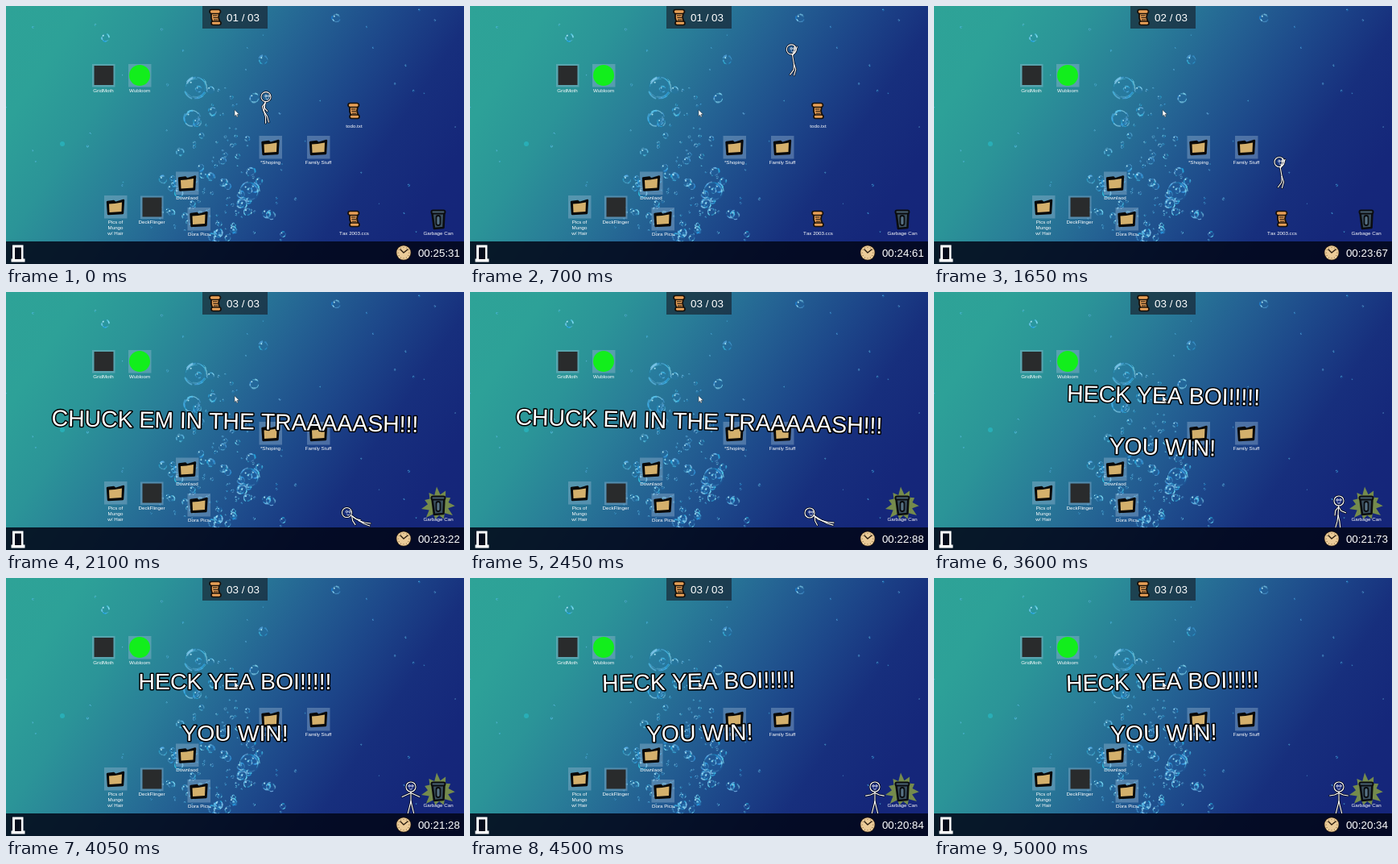
Recreate the animation shown at these times as an HTML page with a canvas. Size 569x320 px, loop 5.05 s.

```html
<!DOCTYPE html>
<html lang="en">
<head>
<meta charset="utf-8">
<title>Desktop dash</title>
<style>
  html, body { margin: 0; width: 100%; height: 100%; overflow: hidden; background: #15297f; }
  canvas { display: block; width: 569px; height: 320px; }
</style>
</head>
<body>
<canvas id="stage" width="569" height="320"></canvas>
<script>
const W = 569, H = 320, LOOP = 5050, STEP = 50;
const FONT = '"Liberation Sans", Arial, sans-serif';
const TODO_AT = 1.1, TAX_AT = 1.75, WIN_AT = 3.45;
const ctx = document.getElementById('stage').getContext('2d');
const rad = deg => deg * Math.PI / 180;

function ramp(t, from, to) {
  const u = Math.min(1, Math.max(0, (t - from) / (to - from)));
  return u * u * (3 - 2 * u);
}

function line(c, ...pts) {
  c.beginPath();
  pts.forEach(p => c.lineTo(...p));
  c.stroke();
}

function shape(c, pts, fill, edge, width) {
  c.beginPath();
  pts.forEach(p => c.lineTo(...p));
  c.closePath();
  c.fillStyle = fill;
  c.fill();
  if (!edge) return;
  c.strokeStyle = edge;
  c.lineWidth = width;
  c.lineJoin = 'round';
  c.stroke();
}

function box(c, x, y, w, h, r, fill, edge, width) {
  c.beginPath();
  c.roundRect(x, y, w, h, r);
  c.fillStyle = fill;
  c.fill();
  if (!edge) return;
  c.strokeStyle = edge;
  c.lineWidth = width;
  c.stroke();
}

function disc(c, x, y, r, fill) {
  c.beginPath();
  c.arc(x, y, r, 0, 7);
  c.fillStyle = fill;
  c.fill();
}

function at(c, x, y, draw, turn = 0) {
  c.save();
  c.translate(x, y);
  c.rotate(rad(turn));
  draw(c);
  c.restore();
}

function text(c, str, x, y, size, align = 'center', outline = 0) {
  c.font = `${size}px ${FONT}`;
  c.textAlign = align;
  c.fontKerning = 'none';
  c.lineJoin = 'round';
  c.lineWidth = outline;
  c.strokeStyle = '#000';
  if (outline) c.strokeText(str, x, y + size * 0.36);
  c.fillStyle = '#fff';
  c.fillText(str, x, y + size * 0.36);
}

function label(c, lines, x, y) {
  lines.split('|').forEach((s, i) => text(c, s, x, y + i * 7.2, 6.2));
}

// Wallpaper

let seed = 11;
function rnd() {
  seed = (seed * 16807) % 2147483647;
  return seed / 2147483647;
}

// A bubble is a dim film with a broken rim of bright flecks
function bubble(c, x, y, r) {
  disc(c, x, y, r, 'rgba(35,130,200,.14)');
  c.lineCap = 'round';
  const flecks = 3 + r * 1.5;
  for (let i = 0; i < flecks; i++) {
    const a = rnd() * 6.28, rim = r * (0.75 + 0.3 * rnd());
    c.strokeStyle = `hsla(${188 + rnd() * 20},80%,${50 + rnd() * 30}%,${0.25 + rnd() * 0.55})`;
    c.lineWidth = 0.5 + rnd() * Math.min(1.3, r / 4);
    c.beginPath();
    c.arc(x, y, rim, a, a + 0.2 + rnd() * 0.7);
    c.stroke();
  }
  disc(c, x - r * 0.45, y - r * 0.45, Math.min(1, r * 0.25), 'rgba(190,245,255,.85)');
}

function wallpaper(c) {
  const g = c.createLinearGradient(0, 0, 540, 362);
  ['#2ea397', '#2da198', '#2b9498', '#297d98', '#246293', '#1d488a', '#172f7d', '#15277a', '#15257a']
    .forEach((col, i, all) => g.addColorStop(i / (all.length - 1), col));
  c.fillStyle = g;
  c.fillRect(0, 0, W, H);

  for (let i = 0; i < 40; i++) bubble(c, rnd() * W, rnd() * 280, 0.4 + rnd() * 1.2);
  for (let i = 0; i < 130; i++) {
    const y = 75 + 215 * Math.sqrt(rnd());
    const spread = 20 + (y - 70) * 0.35;
    bubble(c, 250 + (rnd() + rnd() - 1) * spread + (y - 70) * 0.06, y, 0.8 + 5 * rnd() ** 2);
  }
  [[236, 101, 14], [231, 139, 10], [303, 230, 12], [320, 67, 6], [308, 114, 6], [123, 39, 5], [410, 15, 5]]
    .forEach(b => bubble(c, ...b));
  disc(c, 70, 171, 3, 'rgba(40,180,190,.8)');
}

// Icons, each centred on 0,0

function tile(c) {
  box(c, -14, -14, 28.5, 28.5, 0, 'rgba(165,190,215,.36)');
}

function folder(c) {
  tile(c);
  shape(c, [[-10, -6], [-2, -7], [0, -5], [10, -8], [9, 8], [-9, 9]], '#0a0a0a', '#0a0a0a', 2.4);
  shape(c, [[-8, -3.5], [-1, -4], [8, -5.5], [7.5, 6], [-7.5, 7]], '#d4b06c');
}

function darkSquare(c) {
  tile(c);
  box(c, -11.5, -12, 24, 24, 0, '#292b2c');
}

function greenDisc(c) {
  tile(c);
  disc(c, 0, 0, 13, '#12ee1c');
}

function scroll(c) {
  const paper = '#e9a057', ink = '#17100a';
  shape(c, [[-5, -6], [5, -5], [4, 0], [6, 7], [-3, 7], [-5, 1]], paper, ink, 1.8);
  box(c, -7, -9.5, 13.5, 5, 2.5, paper, ink, 1.7);
  box(c, -5, 5, 12, 4.5, 2.2, paper, ink, 1.7);
  c.lineWidth = 1;
  for (let y = -2; y < 5; y += 2.5) line(c, [-2.5 + y * 0.2, y], [2.5 + y * 0.2, y]);
}

function trash(c) {
  shape(c, [[-7.5, -7], [7.5, -8], [6.5, 11], [-5, 12]], '#3c5160', '#0b0d10', 2.6);
  box(c, -8.5, -10.5, 17, 4, 2, '#4a6272', '#0b0d10', 2);
  box(c, -2.5, -4, 5, 12, 2.5, '#587386', '#0b0d10', 1.8);
}

function glow(c) {
  const pts = [];
  for (let i = 0; i < 22; i++) {
    const a = rad(i * 180 / 11 - 95), r = i % 2 ? 13 : 20 + 2.5 * Math.cos(i * 2.3);
    pts.push([Math.cos(a) * r, Math.sin(a) * r]);
  }
  shape(c, pts, 'rgba(150,172,62,.75)');
}

function clock(c) {
  disc(c, 0, 0, 9.5, '#2a1c0e');
  disc(c, 0, 0, 8.7, '#ebcb98');
  c.strokeStyle = '#2a1c0e';
  c.lineWidth = 1.4;
  line(c, [-4, -4], [0, 0], [5, -4]);
  for (let i = 0; i < 12; i++) {
    const a = rad(i * 30);
    disc(c, Math.cos(a) * 6.8, Math.sin(a) * 6.8, 0.5, '#6b4d28');
  }
}

function door(c) {
  box(c, -7, -10, 13.5, 20, 0, '#fff');
  box(c, -8.5, 7, 17, 4, 0, '#fff');
  box(c, -4, -7, 8, 14.5, 0, '#060d1c');
}

function cursor(c) {
  shape(c, [[0, 0], [0, 7.5], [1.7, 6], [2.9, 8.7], [4.2, 8.1], [3, 5.5], [5.3, 5.3]], '#fff', '#333', 0.5);
}

function desktop(c) {
  wallpaper(c);
  [[darkSquare, 121, 86, 'GridMoth'], [greenDisc, 166, 86, 'Wubloom'],
   [folder, 328.5, 175, '*Shoping'], [folder, 388, 175, 'Family Stuff'],
   [folder, 225, 219.5, 'Downlaod'], [folder, 136, 249, 'Pics of|Mungo|w/ Hair'],
   [darkSquare, 181, 249.5, 'DeckFlinger'], [folder, 239.5, 264, 'Dora Pics']]
    .forEach(([icon, x, y, name]) => {
      at(c, x, y, icon);
      label(c, name, x, y + 18.5);
    });
  box(c, 0, 292, W, 28, 0, 'rgba(2,6,24,.86)');
  box(c, 244, 0, 81, 28, 0, 'rgba(22,26,38,.62)');
  at(c, 260, 14, scroll);
  at(c, 15, 306.5, door);
  at(c, 494, 306, clock);
}

const back = document.createElement('canvas');
back.width = W;
back.height = H;
desktop(back.getContext('2d'));

// Runner. A pose holds degrees from straight down:
// torso, arm upper, arm lower, arm spread, leg upper, leg lower, leg spread
const LEAP = [-8, -25, 30, 12, 24, 8, 8];
const FLOAT = [10, 152, 166, 8, 8, -26, 10];
const LIE = [58, 25, 50, 22, 68, 80, 6];
const STAND = [-5, -5, 50, 18, 5, -8, 9];
const CHEER = [0, 0, 0, 66, 0, 0, 14];

const mix = (a, b, u) => a.map((v, i) => v + (b[i] - v) * u);
const reach = ([x, y], deg, len) => [x + Math.sin(rad(deg)) * len, y + Math.cos(rad(deg)) * len];

function pose(t) {
  let p = mix(LEAP, FLOAT, ramp(t, 0, 0.6));
  p = mix(p, LIE, ramp(t, TAX_AT, 2.15));
  p = mix(p, STAND, ramp(t, 2.5, 2.8));
  return mix(p, CHEER, ramp(t, WIN_AT, 3.8));
}

function headAt(t) {
  const x = Math.min(429, 323 + 109 * t) - 7 * ramp(t, 1.86, 2.2) + 81 * ramp(t, 2.5, 3.28);
  const arc = 53.5 + 140 * (t - 0.65) ** 2;
  const ground = 268 + 6 * ramp(t, 1.86, 2.15) - 15 * ramp(t, 2.5, 2.8);
  return [x, t < 1.88 ? Math.min(arc, 268) : ground];
}

function runner(c, t) {
  const head = headAt(t);
  const [torso, armTop, armLow, armSpread, legTop, legLow, legSpread] = pose(t);
  const stride = 22 * Math.sin((t - 3.05) * 18) * ramp(t, 2.6, 2.8) * (1 - ramp(t, 3.2, 3.4));
  const wave = 14 * ramp(t, 4.05, 4.6);
  const neck = reach(head, torso, 6), hip = reach(head, torso, 18);
  const limb = (from, len, top, low) => {
    const mid = reach(from, top, len);
    return [from, mid, reach(mid, low, len)];
  };
  const bones = [[neck, hip]];
  for (const side of [-1, 1]) {
    const arm = side * armSpread, leg = side * (legSpread + stride);
    bones.push(limb(reach(neck, torso, 1.5), 6, armTop + arm, armLow + arm + side * wave));
    bones.push(limb(hip, 7.5, legTop + leg, legLow + leg));
  }
  c.lineCap = c.lineJoin = 'round';
  for (const [col, width] of [['#0a0d18', 2.6], ['#fff', 1.1]]) {
    c.strokeStyle = col;
    c.lineWidth = width;
    bones.forEach(b => line(c, ...b));
    c.beginPath();
    c.arc(...head, 6, 0, 7);
    c.stroke();
  }
  const look = 1.8 * (1 - ramp(t, 3.3, 3.5));
  c.lineWidth = 0.8;
  for (const dx of [-1.9, 1.9]) {
    c.beginPath();
    c.arc(head[0] + dx + look, head[1] - 1, 1.2, 0, 7);
    c.stroke();
  }
  c.beginPath();
  c.arc(head[0] + look, head[1] + 1.6, 1.7, 0.3, 2.8);
  c.stroke();
}

function banner(c, lines, angle) {
  at(c, 284.5, 159.8, () => lines.forEach((s, i) =>
    text(c, s, 0, (i * 2 - lines.length + 1) * 32, 28.4, 'center', 3)), angle);
}

function draw(frame) {
  const t = frame * STEP / 1000;
  const c = ctx;
  c.drawImage(back, 0, 0);

  if (t < TODO_AT) {
    at(c, 432, 130, scroll);
    label(c, 'todo.txt', 432.5, 148.7);
  }
  if (t < TAX_AT) {
    at(c, 432, 264, scroll);
    label(c, 'Tax 2003.ccs', 432.5, 282.2);
  } else {
    at(c, 537, 264, glow);
  }
  at(c, 537, 264, trash);
  label(c, 'Garbage Can', 537, 282.2);

  const found = 1 + (t >= TODO_AT) + (t >= TAX_AT);
  text(c, `0${found} / 03`, 294.5, 14.5, 13.4);
  const left = String(Math.round(2531 - frame * 4.9692));
  text(c, `00:${left.slice(0, 2)}:${left.slice(2)}`, 564, 306.3, 13.4, 'right');

  runner(c, t);
  const sway = from => 1.4 * Math.sin((t - from) * 2 * Math.PI / 2.8);
  if (t >= WIN_AT) banner(c, ['HECK YEA BOI!!!!!', 'YOU WIN!'], sway(2.65));
  else if (t >= TAX_AT) banner(c, ['CHUCK EM IN THE TRAAAAASH!!!'], sway(TAX_AT));
  at(c, 284, 129, cursor);
}

function tick() {
  draw(Math.floor(performance.now() % LOOP / STEP));
  requestAnimationFrame(tick);
}
tick();
</script>
</body>
</html>
```
